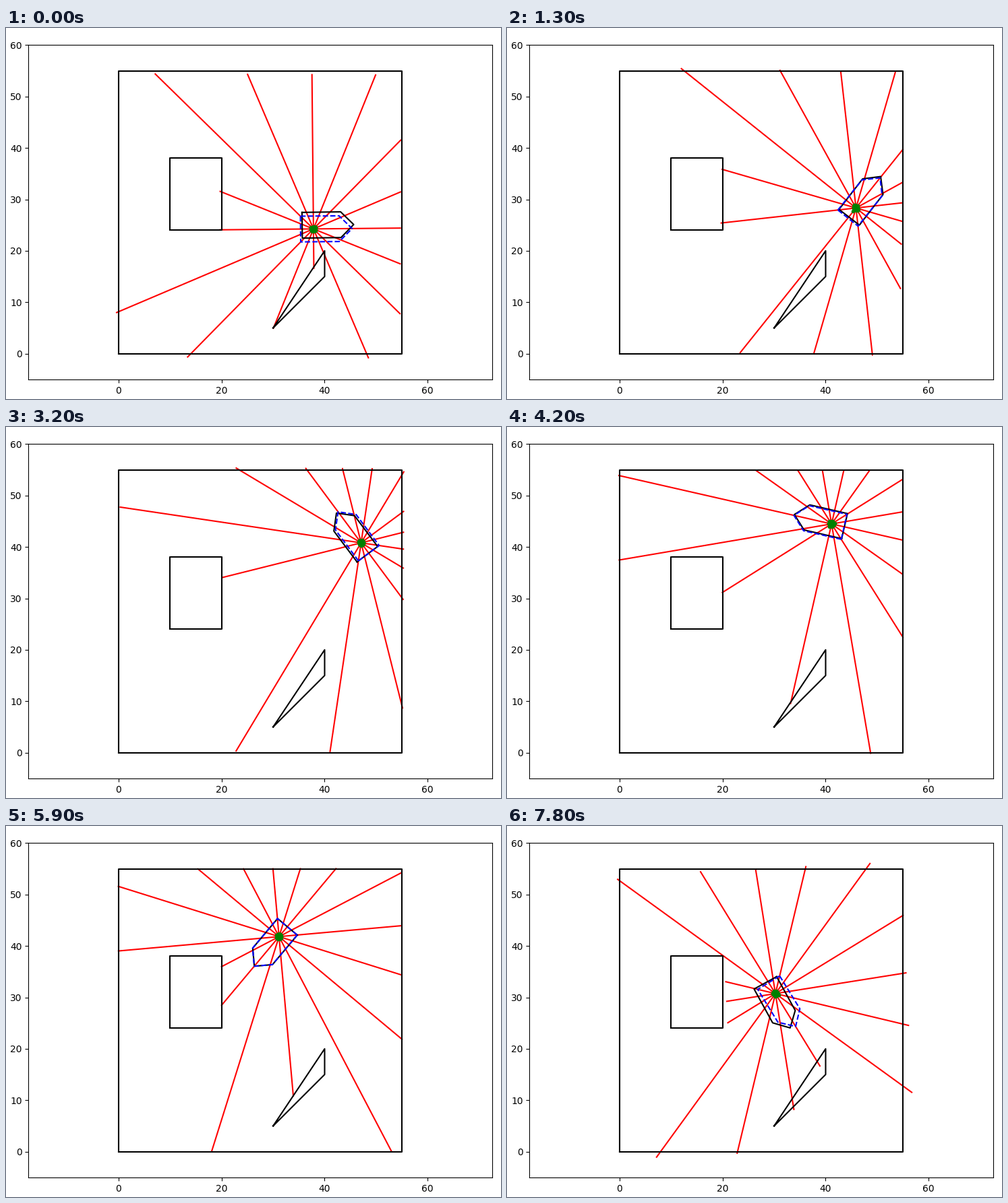
Animation, 734 px wide and 551 px high, one loop 8 s. Source, as a matplotlib script:

```python
import numpy as np
import matplotlib.pyplot as plt
from matplotlib.animation import FuncAnimation

W, H, DPI = 734, 551, 100
FRAME_MS, LOOP_MS = 100, 8000
MAX_RANGE = 50

# Frames at which the picture may change: steady at first, then in bursts.
SHOWN = np.round(np.r_[0:2200:23j, 2400, 2900, 3200:3400:2j, 3700:4200:4j, 4500:5200:5j,
                       5500:6500:6j, 6700, 7000:7800:5j] / FRAME_MS)

# Key points of the estimate's drift: seconds, dx, dy, degrees.
DRIFT = np.array([
    (0.0, -0.31, -0.75, -0.25),
    (1.3, -0.21, -0.18, -1.0),
    (2.0, -0.04, -0.06, -0.4),
    (3.2, 0.29, 0.21, -0.3),
    (5.0, -0.39, -0.42, 0.6),
    (6.7, 0.30, 0.39, -0.3),
    (7.8, 0.75, 0.10, 2.8)]).T

# The robot circles: 1 unit forward and 0.1 rad of turn per tick.
CENTER, RADIUS, STEP = np.array([38.5, 35.0]), 10, 0.1
START = np.radians(0.8)
BEAMS = np.arange(16) * np.pi / 8


def closed(*points):
    return np.array(points + points[:1], float)


def rect(x0, y0, x1, y1):
    return closed((x0, y0), (x1, y0), (x1, y1), (x0, y1))


ROBOT = closed((-2.5, 2.5), (5, 2.5), (7.5, 0), (5, -2.5), (-2.5, -2.5))
WALLS = [rect(0, 0, 55, 55), rect(10, 24, 20, 38), closed((30, 5), (40, 20), (40, 15))]
SEG_A = np.vstack([w[:-1] for w in WALLS])
SEG_D = np.vstack([np.diff(w, axis=0) for w in WALLS])


def unit(angle):
    return np.array([np.cos(angle), np.sin(angle)])


def cross(a, b):
    return a[..., 0] * b[..., 1] - a[..., 1] * b[..., 0]


def tick_at(t):
    """Simulation tick reached after t seconds; it slows down slightly."""
    return int(7.15 * t - 0.062 * t * t + 0.28)


def true_pose(tick):
    heading = START + STEP * tick
    return CENTER + RADIUS * unit(heading - STEP / 2 - np.pi / 2), heading


def cast(pos, angle):
    """Distance from pos to the nearest wall along angle."""
    d = unit(angle)
    den = cross(d, SEG_D)
    den = np.where(np.abs(den) < 1e-12, 1e-12, den)
    to_seg = SEG_A - pos
    dist = cross(to_seg, SEG_D) / den
    along = cross(to_seg, d) / den
    return dist[(dist > 0) & (along >= 0) & (along <= 1)].min()


def outline(pos, heading):
    c, s = unit(heading)
    return (pos + ROBOT @ np.array([[c, s], [-s, c]])).T


fig = plt.figure(figsize=(W / DPI, H / DPI), dpi=DPI, facecolor="white")
ax = fig.add_axes([33.3 / W, 29.15 / H, 687.4 / W, 496.45 / H])
ax.set_xlim(-17.5, 72.5)
ax.set_ylim(-5, 60)
ax.set_xticks(range(0, 61, 20))
ax.set_yticks(range(0, 61, 10))

rays = [ax.plot([], [], "r-", lw=1.5)[0] for _ in BEAMS]
for wall in WALLS:
    ax.plot(*wall.T, "k-", lw=1.5)
robot, = ax.plot([], [], "k-", lw=1.5)
guess, = ax.plot([], [], "b--", lw=1.5)
cloud, = ax.plot([], [], "g.", ms=6)


def draw(frame):
    t = SHOWN[SHOWN <= frame][-1] * FRAME_MS / 1000
    tick = tick_at(t)
    pos, heading = true_pose(tick)
    dx, dy, turn = (np.interp(t, DRIFT[0], row) for row in DRIFT[1:])
    est, est_heading = pos + (dx, dy), heading + np.radians(turn)

    for ray, beam in zip(rays, BEAMS):
        dist = cast(pos, heading + beam)
        end = est + dist * unit(est_heading + beam)
        ray.set_data([est[0], end[0]], [est[1], end[1]])
        ray.set_visible(dist < MAX_RANGE)
    robot.set_data(*outline(pos, heading))
    guess.set_data(*outline(est, est_heading))

    rng = np.random.default_rng(tick)
    cloud.set_data(*(est + rng.normal(0, 0.22, (100, 2))).T)
    return [*rays, robot, guess, cloud]


anim = FuncAnimation(fig, draw, frames=LOOP_MS // FRAME_MS, interval=FRAME_MS,
                     repeat=True, repeat_delay=0)
plt.show()
```
